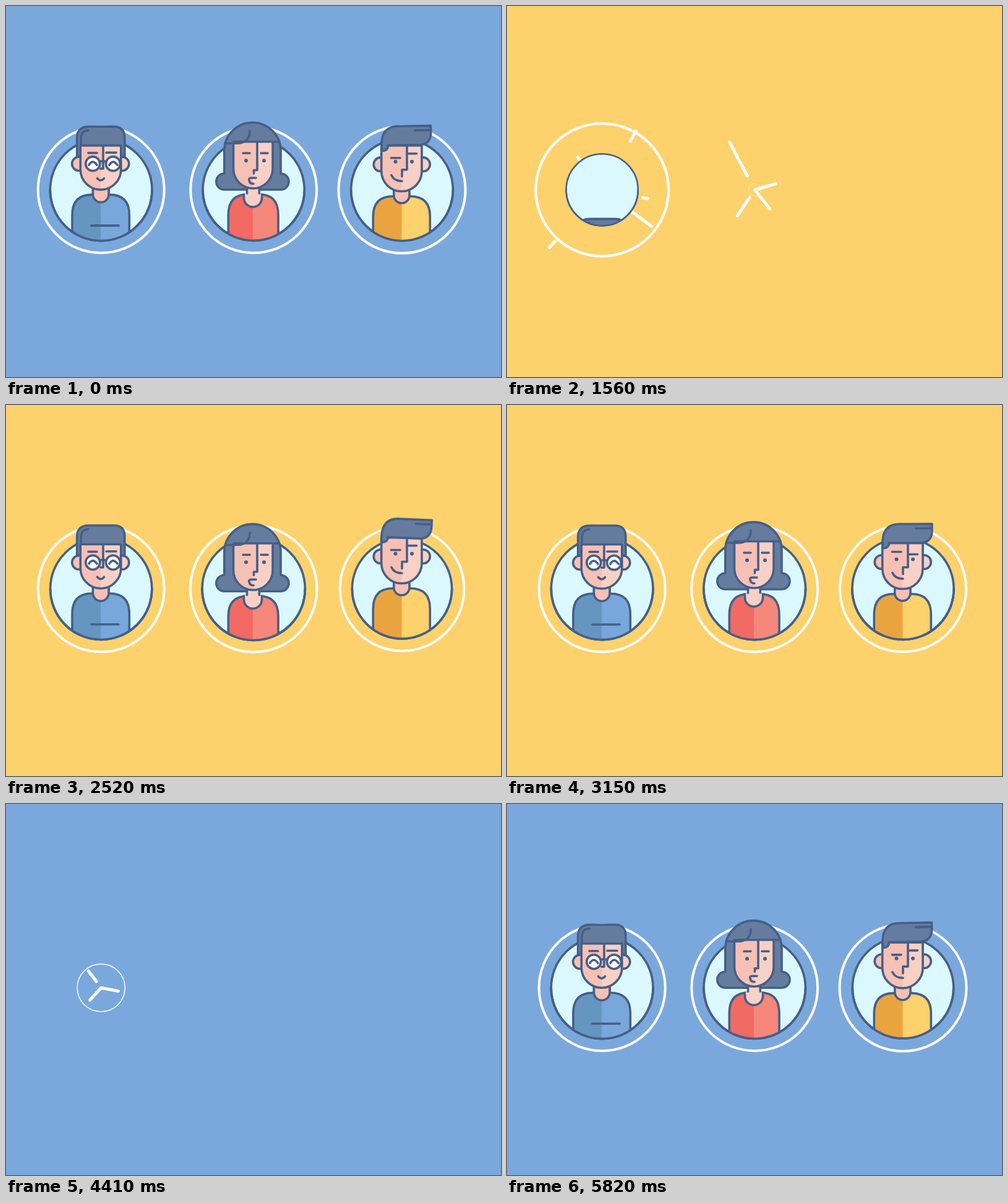
Write an HTML page that moves like this. It is 800 by 600 pixels and loops after 5.85 s.

```html
<!DOCTYPE html>
<html lang="en">
<head>
<meta charset="utf-8">
<title>Three avatars</title>
<style>
  html, body { margin: 0; width: 100%; height: 100%; overflow: hidden; background: #7aa8dc; }
  svg { display: block; width: 100vw; height: 100vh; }
  .ink { fill: none; stroke: #455f87; stroke-width: 3.6; stroke-linecap: round; stroke-linejoin: round; }
  .hair { fill: #667c9f; }
  .skin { fill: #f7c0b4; }
  .light { fill: #f9d0c5; }
  .white { fill: #fff; }
  .dot { fill: #455f87; }
  .ring { fill: none; stroke: #fff; stroke-width: 4; }
  .disc { fill: #dcf8ff; stroke: #455f87; stroke-width: 3.6; }
  .ray { stroke: #fff; stroke-width: 5; stroke-linecap: round; }
</style>
</head>
<body>
<svg id="stage" viewBox="0 0 800 600">
  <rect id="back" width="800" height="600"/>
  <g id="people"></g>
  <circle id="cover" cx="400" cy="300"/>
</svg>
<script>
const LOOP = 5850, HALF = 3105, COVER = 660, COVER_TIME = 520;
const BLUE = '#7aa8dc', YELLOW = '#fdd26c';
const CY = 297.3, RING = 102, DISC = 82.3;
const $ = id => document.getElementById(id);
const clamp = x => Math.min(1, Math.max(0, x));
const easeOut = x => 1 - (1 - clamp(x)) ** 2;

// Linear travel from 0 to 1, then a decaying bounce.
function bounce(p, start, end) {
  if (p < end) return clamp((p - start) / (end - start));
  const s = (p - end) / 1000;
  return 1 + 34 / (end - start) * Math.sin(4 * Math.PI * s) * Math.exp(-5 * s);
}

const path = (cls, d) => `<path class="${cls}" d="${d}"/>`;
const circle = (cls, x, y, r) => `<circle class="${cls}" cx="${x}" cy="${y}" r="${r}"/>`;
const line = d => path('ink', d);

function shirt(l, r, top, mid, dark, light) {
  const d = `M${l} 420V${top + 33}Q${l} ${top} ${l + 32} ${top}H${r - 32}Q${r} ${top} ${r} ${top + 33}V420`;
  return `<path d="${d}Z" fill="${dark}"/>
    <path d="M${mid} 420V${top}H${r - 32}Q${r} ${top} ${r} ${top + 33}V420Z" fill="${light}"/>` + line(d);
}

function neck(l, r, top, low) {
  const h = (r - l) / 2;
  return path('ink skin', `M${l} ${top}V${low}a${h} ${h} 0 0 0 ${r - l} 0V${top}`);
}

// The light side follows the nose line down, then the middle of the chin.
function face(l, r, top, low, nose, noseY) {
  const h = (r - l) / 2, mid = l + h, y = low - h;
  const d = `M${l} ${top}V${y}A${h} ${h} 0 0 0 ${r} ${y}V${top}Z`;
  return path('skin', d) +
    path('light', `M${nose} ${top}V${noseY}H${mid}V${low}A${h} ${h} 0 0 0 ${r} ${y}V${top}Z`) + line(d);
}

const ears = (l, r, y) => circle('ink skin', l, y, 11.3) + circle('ink light', r, y, 11.3);

const glassesMan =
  neck(140.5, 166, 290, 304.5) +
  shirt(107, 199.3, 305, 153, '#6596c1', '#78a7dc') +
  neck(140.5, 166, 290, 304.5) +
  line('M138 355H182') +
  ears(118, 187.5, 255) +
  path('ink hair', 'M114.7 243V214Q114.7 195 134 195H174Q191.8 195 191.8 213V243Z') +
  face(120.3, 185.8, 225.5, 297, 157, 263) +
  line('M133 201Q121 202 121 214V225M133 237.5H147M162 237H178M157 226V263H153') +
  circle('ink white', 140.3, 255, 11.5) + circle('ink white', 173, 255, 11.5) +
  line('M151.8 252Q156.5 249 161.5 252M134 257Q140 247 147 257M167 257Q173 247 180 257M147.5 278.5Q153 285 158.5 278.5');

const woman =
  path('ink hair', 'M352.8 235V272a13 13 0 0 0 0 26H444a13 13 0 0 0 0-26V235a45.6 45.6 0 0 0-91.2 0Z') +
  shirt(359.3, 440, 305.5, 399, '#f16a63', '#f5877b') +
  path('ink light', 'M384.5 306V311.5a14.5 14.5 0 0 0 29 0V306') +
  path('light', 'M386.3 304H389.5V290H409V304H411.7V309H386.3Z') +
  line('M389.5 296V304M409.3 296V304') +
  face(367.5, 431, 220.5, 296, 406, 266) +
  line('M354 223H376Q394 221 394 203M431 220.5H442') +
  line('M383 239H394M412 239H423M406 222V266.5H400.5V272M404 279H396Q392 279 393 283Q394 288.5 400 288.5') +
  circle('dot', 388, 251, 3) + circle('dot', 417, 251, 3);

const quiffMan =
  shirt(593.3, 685.3, 306, 639.5, '#e9a440', '#fdd16b') +
  neck(626.8, 652, 290, 304.5) +
  ears(605.5, 674, 254.5) +
  face(606.7, 672, 224, 298, 648, 263) +
  `<g id="quiff">` +
  path('ink hair', 'M607 232V221Q608 193 634 193H687V203Q687 223.5 667 223.5H617V227Q614 233 607 232Z') +
  line('M661 200H686') + `</g>` +
  line('M648 225V263H640V274M623 272Q627 281.5 640 281.5') +
  `<g id="browL">${line('M622.5 238H637')}</g><g id="browR">${line('M650.5 242H663.5')}</g>` +
  circle('dot', 629.5, 250, 3) + circle('dot', 656, 250, 3);

// Each ray: direction x, y, reach, delay, lag of the tail.
const people = [
  { x: 153.7, start: 1185, up: 630, art: glassesMan, rays: [
    [-39, -52, 66, 0, .2], [45, -78, 135, 149, .14], [80, 59, 164, 227, .165],
    [-85, 93, 135, 79, .15], [73, 14, 77, 39, .2]] },
  { x: 400.2, start: 1530, up: 630, art: woman, rays: [
    [-40, -76, 143, -118, .28], [-28, 42, 83, -118, .28], [24, 30, 129, -35, .2],
    [34, -10, 72, -84, .28], [-134, 81, 168, 51, .1]] },
  { x: 640, start: 1823, up: 645, art: quiffMan, rays: [
    [9, -6, 190, 40, .2], [4, 17, 147, 27, .2], [-70, -85, 125, 85, .16],
    [-90, 60, 120, 70, .16], [90, 75, 140, 110, .15]] }
];

$('people').innerHTML = people.map((m, i) => `
  <g id="rays${i}">${m.rays.map(() => '<line class="ray"/>').join('')}</g>
  <g id="ring${i}">${circle('ring', 0, 0, RING)}</g>
  <g id="disc${i}">${circle('disc', 0, 0, DISC)}</g>
  <clipPath id="clip${i}"><path/></clipPath>
  <g clip-path="url(#clip${i})"><g id="body${i}">${m.art}</g></g>
  <g id="rim${i}">${line(`M${-DISC} 0A${DISC} ${DISC} 0 0 0 ${DISC} 0`)}</g>`).join('');

function drawRay(el, [dx, dy, reach, delay, lag], x, p) {
  const k = (p - delay) / 400, len = Math.hypot(dx, dy);
  const fade = clamp(1 - (p - delay - 400) / 180);
  el.setAttribute('opacity', k > 0 ? fade : 0);
  [easeOut(k - lag), easeOut(k)].forEach((e, n) => {
    el.setAttribute('x' + (n + 1), x + dx / len * reach * e);
    el.setAttribute('y' + (n + 1), CY + dy / len * reach * e);
  });
}

function drawPerson(m, i, time) {
  const p = time - m.start;
  const place = (id, s) => $(id + i).setAttribute('transform', `translate(${m.x} ${CY}) scale(${s})`);
  const disc = bounce(p, 273, 419), r = DISC * disc;
  place('ring', bounce(p, 0, 320));
  place('disc', disc);
  place('rim', disc);
  $('clip' + i).firstChild.setAttribute('d',
    `M${m.x - r} ${CY}A${r} ${r} 0 0 0 ${m.x + r} ${CY}V0H${m.x - r}Z`);
  const lift = 190 * (1 - bounce(p, m.up - 323, m.up));
  $('body' + i).setAttribute('transform', `translate(0 ${lift})`);
  $('body' + i).setAttribute('visibility', disc > 0 ? 'visible' : 'hidden');
  [...$('rays' + i).children].forEach((el, n) => drawRay(el, m.rays[n], m.x, p));
}

function drawQuirks(p) {
  const s = Math.max(0, p - 650) / 1000;
  const tilt = 4 * Math.exp(-5 * s) * Math.cos(4 * Math.PI * s);
  const brow = clamp((p - 500) / 150) * clamp((1250 - p) / 100);
  $('quiff').setAttribute('transform', `rotate(${tilt} 625 222)`);
  $('browL').setAttribute('transform', `translate(0 ${6 * brow})`);
  $('browR').setAttribute('transform', `translate(0 ${-5 * brow})`);
}

function draw(t) {
  const turn = COVER + COVER_TIME;
  const yellow = t >= turn && t < turn + HALF;
  const time = t < turn ? t + LOOP - HALF : yellow ? t : t - HALF;
  $('back').setAttribute('fill', yellow ? YELLOW : BLUE);
  people.forEach((m, i) => drawPerson(m, i, time));
  drawQuirks(time - people[2].start);
  const c = yellow ? t - COVER - HALF : t - COVER;
  const on = c > 0 && c < COVER_TIME;
  $('cover').setAttribute('r', on ? .456 * c + .00113 * c * c : 0);
  $('cover').setAttribute('fill', yellow ? BLUE : YELLOW);
}

const begin = performance.now();
function tick() {
  draw((performance.now() - begin) % LOOP);
  requestAnimationFrame(tick);
}
tick();
</script>
</body>
</html>
```
